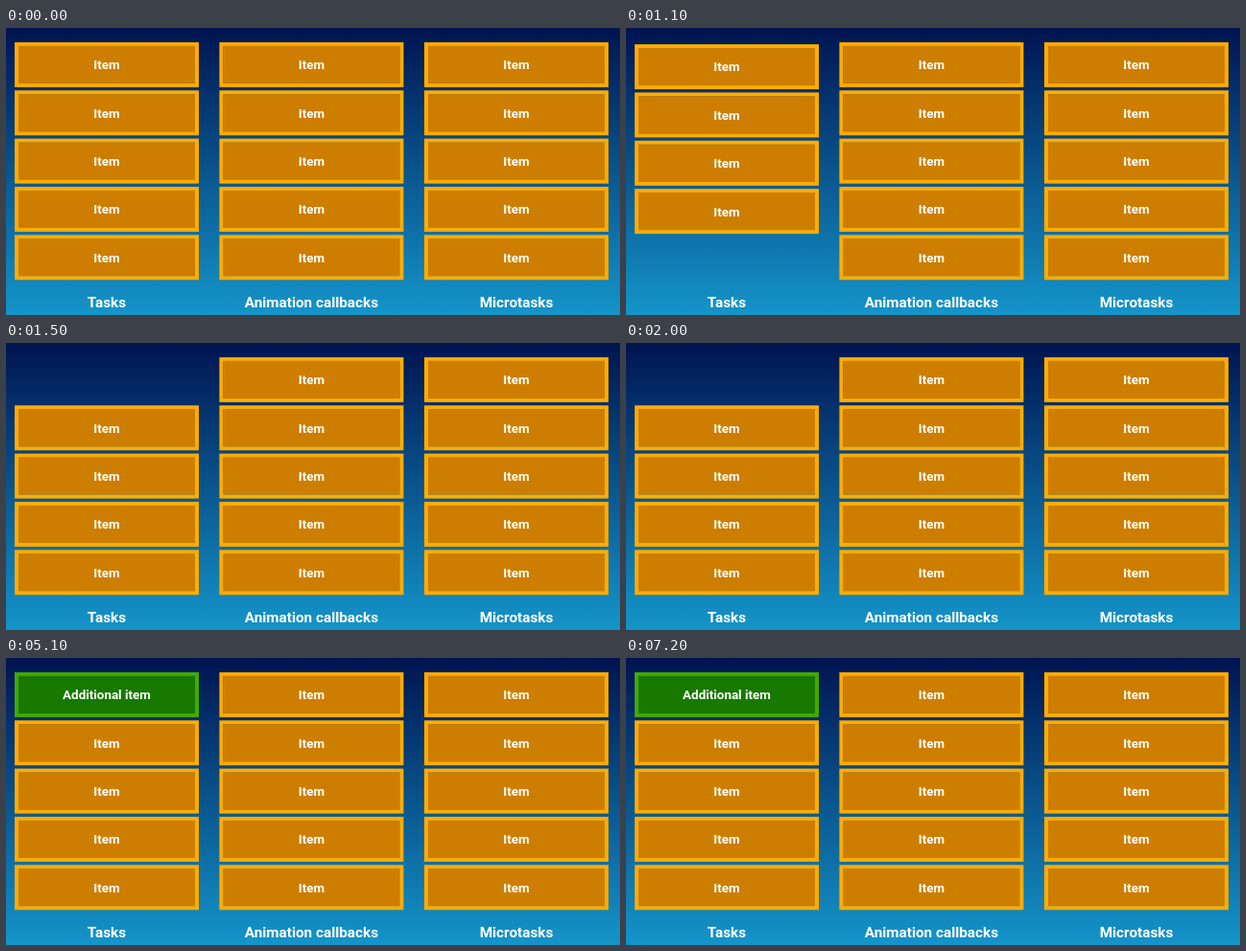
These frames come from a looping animation (640 by 300 pixels, 8100 ms). An HTML page with a canvas:

```html
<!DOCTYPE html>
<html lang="en">
<head>
<meta charset="utf-8">
<title>Task queues</title>
<style>
  html, body { margin: 0; width: 100%; height: 100%; overflow: hidden; background: #001450; }
  canvas { display: block; width: 640px; height: 300px; }
</style>
</head>
<body>
<canvas id="stage" width="640" height="300"></canvas>
<script>
const ctx = document.getElementById('stage').getContext('2d');
const LOOP = 8100, STEP = 100, DURATION = 200;
const REMOVE_AT = 888, DROP_AT = REMOVE_AT + DURATION, ADD_AT = 4039;
const COLUMNS = [105, 318.4, 532];
const LABELS = ['Tasks', 'Animation callbacks', 'Microtasks'];
const BOX = { w: 192, h: 47, border: 4 };
const FIRST_Y = 38.4, PITCH = 50.35, ROWS = 5;
const AMBER = { fill: '#cd7e00', edge: '#ffac00' };
const GREEN = { fill: '#187900', edge: '#42aa00' };

// cubic-bezier(.25, .1, .25, 1), solved by bisection
function ease(x) {
  if (x <= 0) return 0;
  if (x >= 1) return 1;
  const bezier = (a, b, u) => 3 * a * u * (1 - u) ** 2 + 3 * b * u * u * (1 - u) + u ** 3;
  let lo = 0, hi = 1;
  for (let i = 0; i < 24; i++) {
    const mid = (lo + hi) / 2;
    if (bezier(0.25, 0.25, mid) < x) lo = mid; else hi = mid;
  }
  return bezier(0.1, 1, lo);
}

const progress = (t, start) => ease((t - start) / DURATION);
const rowY = row => FIRST_Y + row * PITCH;

function text(str, x, y, size) {
  ctx.font = `bold ${size}px Roboto, sans-serif`;
  ctx.fillStyle = '#fff';
  ctx.fillText(str, x, y);
}

function item(x, y, label = 'Item', colors = AMBER, scale = 1) {
  if (scale <= 0) return;
  const { w, h, border } = BOX;
  ctx.save();
  ctx.translate(x, y);
  ctx.scale(scale, scale);
  ctx.globalAlpha = scale;
  ctx.fillStyle = colors.fill;
  ctx.fillRect(-w / 2 + border, -h / 2 + border, w - 2 * border, h - 2 * border);
  ctx.strokeStyle = colors.edge;
  ctx.lineWidth = border;
  ctx.strokeRect((border - w) / 2, (border - h) / 2, w - border, h - border);
  text(label, 0, 4.9, 13.4);
  ctx.restore();
}

function draw(t) {
  const sky = ctx.createLinearGradient(0, 0, 0, 300);
  sky.addColorStop(0, '#001450');
  sky.addColorStop(1, '#1495ca');
  ctx.fillStyle = sky;
  ctx.fillRect(0, 0, 640, 300);
  ctx.textAlign = 'center';

  const drop = progress(t, DROP_AT);
  COLUMNS.forEach((x, col) => {
    for (let row = 0; row < ROWS; row++) {
      const isTask = col === 0;
      if (isTask && row === ROWS - 1) {
        item(x, rowY(row), 'Item', AMBER, 1 - progress(t, REMOVE_AT));
      } else {
        item(x, rowY(row + (isTask ? drop : 0)));
      }
    }
    text(LABELS[col], x, 292, 15.3);
  });
  item(COLUMNS[0], rowY(0), 'Additional item', GREEN, progress(t, ADD_AT));
}

const begin = performance.now();
function tick() {
  const t = (performance.now() - begin) % LOOP;
  draw(Math.floor((t + 0.5) / STEP) * STEP % LOOP);
  requestAnimationFrame(tick);
}
tick();
</script>
</body>
</html>
```
